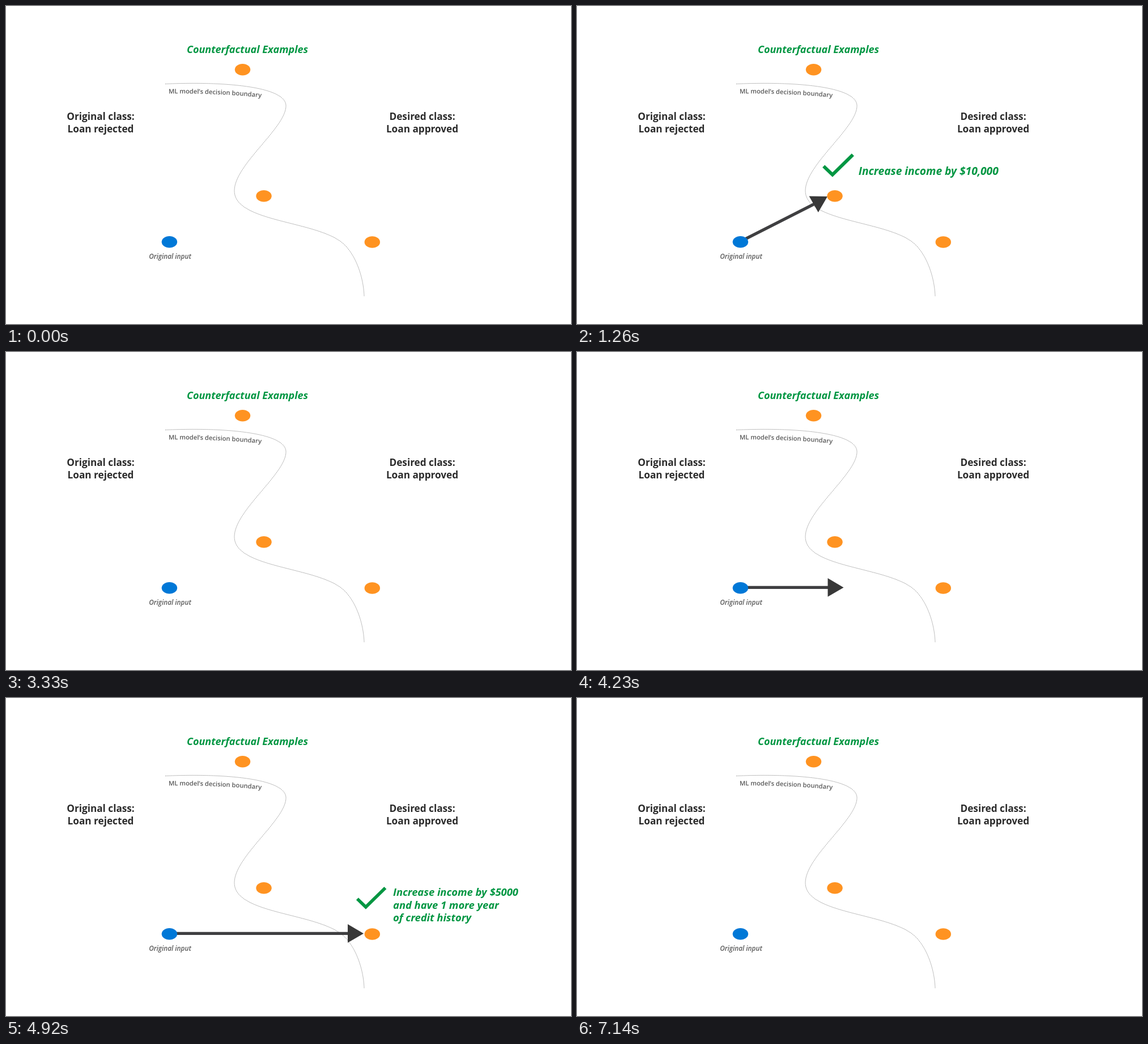
An HTML page with a canvas that plays this animation: 997x561 px, repeating every 7200 ms.

```html
<!DOCTYPE html>
<html lang="en">
<head>
<meta charset="utf-8">
<title>Counterfactual Examples</title>
<style>
  html, body { margin: 0; width: 100%; height: 100%; overflow: hidden; background: #fff; }
  canvas { display: block; }
</style>
</head>
<body>
<canvas id="stage" width="997" height="561"></canvas>
<script>
const ctx = document.getElementById('stage').getContext('2d');
const LOOP = 7200;
const FAMILY = '"Open Sans", "Noto Sans", sans-serif';
const GREEN = '#009642', ORANGE = '#ff9321', BLUE = '#0078d7';
const INK = '#2b2b2b', GRAY = '#595959';
const ARROW_MS = 525, POP_DELAY = 490, GROW_MS = 230, SETTLE_MS = 182, PEAK = 1.2, FADE_MS = 330;

const scenes = [
  {
    start: 367, fade: 2820,
    from: [325, 396], tip: [442, 336], angle: -29.5 * Math.PI / 180,
    check: [460, 281.2], checkPivot: [445, 291],
    text: [493.5, 297.5], textPivot: [437, 291],
    lines: ['Increase income by $10,000']
  },
  {
    start: 3985, fade: 6420,
    from: [329, 415.4], tip: [631, 415.4], angle: 0,
    check: [644.5, 352.5], checkPivot: [644.5, 353],
    text: [683, 349.5], textPivot: [684, 365],
    lines: ['Increase income by $5000', 'and have 1 more year', 'of credit history']
  }
];

const clamp = v => Math.min(1, Math.max(0, v));
const mix = (a, b, k) => a + (b - a) * k;

function label(str, x, y, style, color, align = 'left') {
  ctx.font = `${style} ${FAMILY}`;
  ctx.fillStyle = color;
  ctx.textAlign = align;
  ctx.fillText(str, x, y);
}

function dot(x, y, color) {
  ctx.fillStyle = color;
  ctx.beginPath();
  ctx.ellipse(x, y, 13.7, 10.3, 0, 0, Math.PI * 2);
  ctx.fill();
}

function boundary() {
  ctx.save();
  ctx.strokeStyle = '#7f7f7f';
  ctx.lineWidth = 1;
  ctx.setLineDash([1.1, 1.1]);
  ctx.beginPath();
  ctx.moveTo(281, 137.5);
  ctx.bezierCurveTo(380, 133, 494, 141, 494, 176);
  ctx.bezierCurveTo(494, 215, 403, 280, 403, 326);
  ctx.bezierCurveTo(403, 384, 560, 378, 600, 424);
  ctx.bezierCurveTo(620, 446, 631, 482, 632, 512);
  ctx.stroke();
  ctx.restore();
}

// Letters follow a shallow parabola below the boundary.
function curvedLabel(str, x) {
  const bend = 0.00033, top = 305;
  ctx.font = `600 11.2px ${FAMILY}`;
  ctx.fillStyle = GRAY;
  ctx.textAlign = 'center';
  for (const ch of str) {
    const w = ctx.measureText(ch).width, d = x + w / 2 - top;
    ctx.save();
    ctx.translate(x + w / 2, 154.3 + bend * d * d);
    ctx.rotate(Math.atan(2 * bend * d));
    ctx.fillText(ch, 0, 0);
    ctx.restore();
    x += w;
  }
}

function arrow({ from, tip, angle }, k) {
  const x = mix(from[0], tip[0], k), y = mix(from[1], tip[1], k);
  const cos = Math.cos(angle), sin = Math.sin(angle);
  const baseX = x - 28 * cos, baseY = y - 28 * sin;
  ctx.strokeStyle = '#3f3f41';
  ctx.lineWidth = 5.4;
  ctx.beginPath();
  ctx.moveTo(288.5, 415.4);
  ctx.lineTo(baseX + cos, baseY + sin);
  ctx.stroke();
  ctx.fillStyle = '#383838';
  ctx.beginPath();
  ctx.moveTo(x, y);
  ctx.lineTo(baseX + 16.4 * sin, baseY - 16.4 * cos);
  ctx.lineTo(baseX - 16.4 * sin, baseY + 16.4 * cos);
  ctx.fill();
}

function scaled([x, y], s, draw) {
  ctx.save();
  ctx.translate(x, y);
  ctx.scale(s, s);
  ctx.translate(-x, -y);
  draw();
  ctx.restore();
}

function checkMark([x, y]) {
  ctx.strokeStyle = GREEN;
  ctx.lineWidth = 5.6;
  ctx.beginPath();
  ctx.moveTo(x - 24.3, y + 1.8);
  ctx.lineTo(x - 9.5, y + 16);
  ctx.lineTo(x + 24.5, y - 17.2);
  ctx.stroke();
}

// Grows past full size, then settles back to it.
function popScale(t) {
  const up = GROW_MS * PEAK;
  return t < up ? t / GROW_MS : mix(PEAK, 1, clamp((t - up) / SETTLE_MS));
}

function playScene(scene, time) {
  const t = time - scene.start;
  const alpha = 1 - clamp((time - scene.fade) / FADE_MS);
  if (t < 0 || alpha === 0) return;
  ctx.globalAlpha = alpha;
  arrow(scene, clamp(t / ARROW_MS));
  const s = popScale(t - POP_DELAY);
  if (s > 0) {
    scaled(scene.checkPivot, s, () => checkMark(scene.check));
    scaled(scene.textPivot, s, () => scene.lines.forEach((line, i) =>
      label(line, scene.text[0], scene.text[1] + 22 * i, 'italic 700 18.1px', GREEN)));
  }
  ctx.globalAlpha = 1;
}

function render(time) {
  ctx.fillStyle = '#fff';
  ctx.fillRect(0, 0, 997, 561);
  boundary();
  curvedLabel('ML model’s decision boundary', 287);
  label('Counterfactual Examples', 426, 82.5, 'italic 700 18px', GREEN, 'center');
  const heading = '700 17.2px';
  label('Original class:', 167, 201, heading, INK, 'center');
  label('Loan rejected', 167, 223, heading, INK, 'center');
  label('Desired class:', 734.5, 201, heading, INK, 'center');
  label('Loan approved', 734.5, 223, heading, INK, 'center');
  label('Original input', 289.5, 446, 'italic 600 11.8px', GRAY, 'center');
  for (const scene of scenes) playScene(scene, time);
  dot(417.5, 112.3, ORANGE);
  dot(455, 335.2, ORANGE);
  dot(646.3, 416.5, ORANGE);
  dot(288.4, 416.2, BLUE);
}

const began = performance.now();
function tick() {
  render((performance.now() - began) % LOOP);
  requestAnimationFrame(tick);
}
tick();
</script>
</body>
</html>
```
